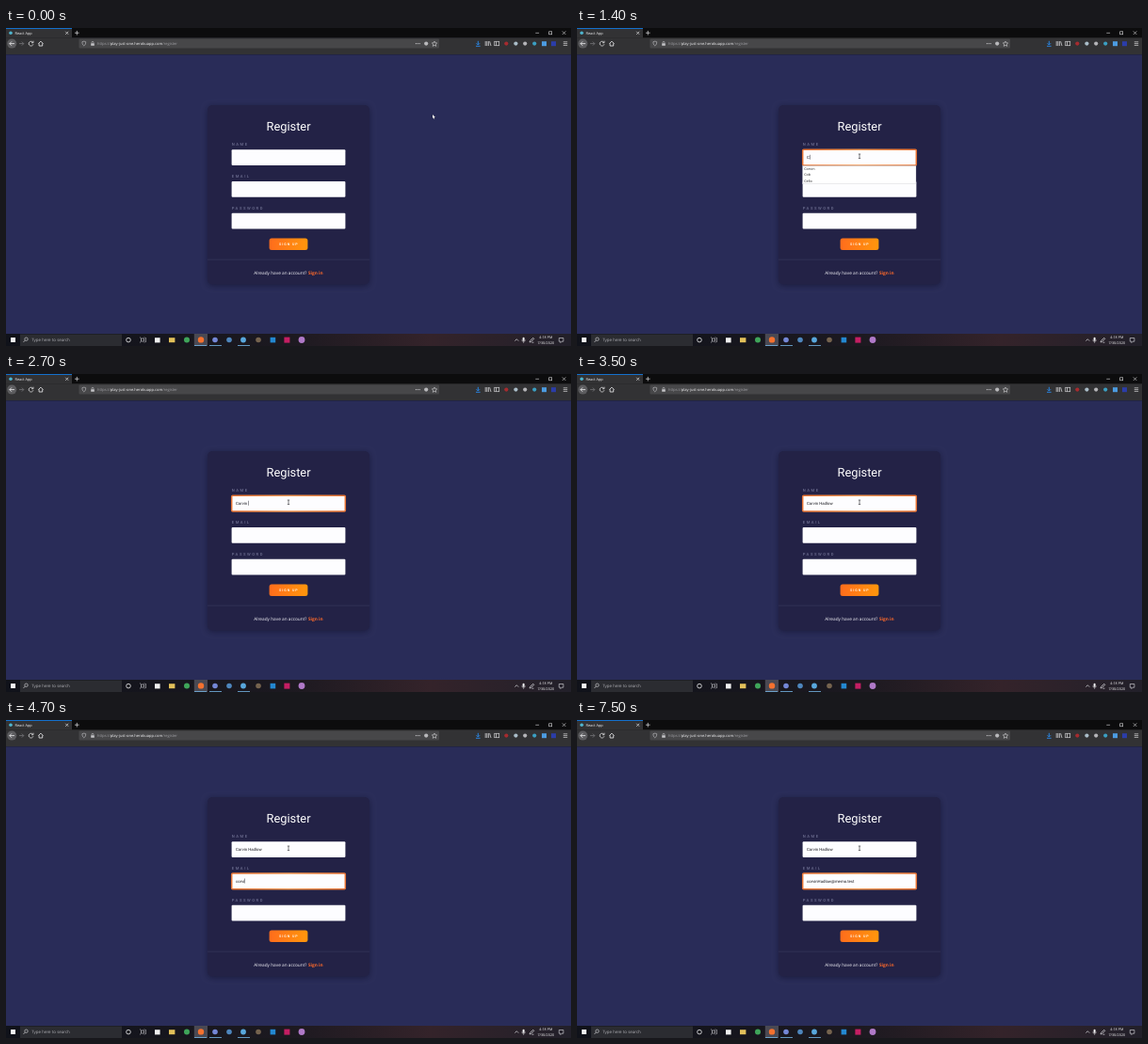
Animation of 600x338 px, one loop 8 s. Source, as an HTML page with a canvas:

```html
<!DOCTYPE html>
<html lang="en">
<head>
<meta charset="utf-8">
<title>Register form</title>
<style>
  html, body { margin: 0; width: 100%; height: 100%; overflow: hidden; background: #292c58; }
  canvas { display: block; width: 600px; height: 338px; }
</style>
</head>
<body>
<canvas id="stage"></canvas>
<script>
const LOOP = 8000;
const ROBOTO = 'Roboto, sans-serif';
const UI = '"Open Sans", sans-serif';
const canvas = document.getElementById('stage');
const ctx = canvas.getContext('2d');
const ratio = window.devicePixelRatio || 1;
canvas.width = 600 * ratio;
canvas.height = 338 * ratio;

// Keys are [time, number of typed characters]; popups are [from, to, rows].
const fields = [
  {
    label: 'NAME', y: 129.5, focus: [600, 3800], text: 'Corvin Hadlow',
    keys: [[1300, 1], [1500, 2], [1700, 3], [1800, 4], [2000, 5], [2200, 6], [2700, 7],
      [2800, 8], [2900, 9], [3000, 10], [3100, 12], [3300, 13]],
    popups: [[1400, 1500, 3], [1500, 1700, 1]],
    hints: ['Corvin', 'Cob', 'Cello']
  },
  {
    label: 'EMAIL', y: 163.3, focus: [3800, LOOP], text: 'corvinHadlow@memo.test',
    keys: [[4000, 1], [4200, 2], [4400, 3], [4600, 4], [4700, 5], [4800, 6], [5400, 7],
      [5500, 8], [5600, 9], [5700, 11], [5900, 12], [6300, 13], [6400, 14], [6500, 15],
      [6700, 16], [6800, 17], [6900, 17], [7000, 18], [7200, 20], [7300, 22]],
    popups: [[4000, 4100, 1], [4100, 4300, 6], [4300, 4400, 1]],
    hints: ['c@c.test', 'cc@c.test', 'cob@c.test', 'co@co.test', 'cello@c.test', 'c@memo.test']
  },
  { label: 'PASSWORD', y: 197, focus: [LOOP, LOOP], text: '', keys: [], popups: [], hints: [] }
];

function rect(x, y, w, h, color, radius = 0) {
  ctx.fillStyle = color;
  ctx.beginPath();
  ctx.roundRect(x, y, w, h, radius);
  ctx.fill();
}

function disc(x, y, r, color) {
  ctx.fillStyle = color;
  ctx.beginPath();
  ctx.arc(x, y, r, 0, Math.PI * 2);
  ctx.fill();
}

function ring(x, y, r, color, width = 0.8) {
  ctx.strokeStyle = color;
  ctx.lineWidth = width;
  ctx.beginPath();
  ctx.arc(x, y, r, 0, Math.PI * 2);
  ctx.stroke();
}

function frame(x, y, w, h, color, width = 0.7) {
  ctx.strokeStyle = color;
  ctx.lineWidth = width;
  ctx.strokeRect(x, y, w, h);
}

function path(d, color, width = 0.8) {
  ctx.strokeStyle = color;
  ctx.lineWidth = width;
  ctx.stroke(new Path2D(d));
}

function shape(d, color) {
  ctx.fillStyle = color;
  ctx.fill(new Path2D(d));
}

function text(str, x, y, size, color, { font = UI, weight = 400, align = 'left', spacing = 0 } = {}) {
  ctx.font = `${weight} ${size}px ${font}`;
  ctx.letterSpacing = spacing + 'px';
  ctx.textAlign = align;
  ctx.textRendering = 'geometricPrecision';
  ctx.fillStyle = color;
  ctx.fillText(str, x, y);
  return ctx.measureText(str).width;
}

function gradient(x0, x1, ...colors) {
  const g = ctx.createLinearGradient(x0, 0, x1, 0);
  colors.forEach((c, i) => g.addColorStop(i / (colors.length - 1), c));
  return g;
}

function drawBrowser() {
  rect(0, 0, 600, 10.5, '#0c0c0d');
  rect(0, 0, 70, 10.5, '#323234');
  rect(0, 0, 70, 0.8, '#0a84ff');
  disc(5, 5.3, 1.8, '#4fb6cf');
  text('React App', 9.5, 7, 3.9, '#f2f2f4');
  path('M63.2 3.8l3 3m0-3l-3 3M73 5.2h4.6M75.3 2.9v4.6', '#e4e4e6', 0.7);
  path('M562.3 5.3h3.8M590.8 3.4l3.6 3.6m0-3.6l-3.6 3.6', '#dedee0', 0.6);
  frame(576.7, 3.8, 3, 3, '#dedee0', 0.6);

  rect(0, 10.5, 600, 17.5, '#323234');
  disc(6.2, 16.6, 5, '#5c5c5f');
  path('M9 16.6H3.8m2.2-2.2l-2.2 2.2 2.2 2.2', '#f0f0f2');
  path('M14 16.6h4.8m-2-2l2 2-2 2', '#77777a');
  path('M28.6 15.3a2.4 2.4 0 1 0 .3 2M29 13.7v2h-2', '#dcdcde');
  path('M34.3 16.7l2.6-2.6 2.6 2.6M35.1 16.3v2.7h3.6v-2.7', '#dcdcde', 0.9);

  rect(77.5, 11.6, 382.5, 10, '#474749', 1);
  path('M82.8 14.1l1.9.6c0 2-.5 3.3-1.9 4.2-1.4-.9-1.9-2.2-1.9-4.2z', '#c5c5c8', 0.6);
  rect(90.2, 16.2, 3.6, 2.6, '#c5c5c8', 0.4);
  path('M91 16.3v-1a1 1 0 0 1 2 0v1', '#c5c5c8', 0.6);
  let x = 97;
  x += text('https://', x, 18, 4.05, '#a0a0a4');
  x += text('play-just-one.herokuapp.com', x, 18, 4.05, '#f4f4f6');
  text('/register', x, 18, 4.05, '#a0a0a4');
  for (let i = 0; i < 3; i++) disc(435.4 + i * 1.9, 16.6, 0.6, '#d4d4d6');
  disc(446.2, 16.6, 2.1, '#b8b8bb');
  path('M455 14l.8 1.8 1.9.2-1.4 1.3.4 2-1.7-1-1.7 1 .4-2-1.4-1.3 1.9-.2z', '#d8d8da', 0.6);

  path('M501.3 13.8v4m-1.8-1.6l1.8 1.8 1.8-1.8M499 19.3h4.6', '#2a8cf0', 0.9);
  path('M509.2 14v5m1.6-5v5m1.6-5v5m1.2-4.8l1.4 4.8', '#d0d0d2', 0.8);
  frame(518.7, 14.3, 5, 4.4, '#d0d0d2');
  path('M520.6 14.3v4.4', '#d0d0d2');
  disc(531.3, 16.6, 2.1, '#a52b2f');
  disc(541.4, 16.6, 2.1, '#a9bcc8');
  disc(551.2, 16.6, 2.1, '#b4b4b8');
  disc(561.2, 16.6, 2.1, '#3b9fc2');
  rect(569, 14.2, 5, 5, '#4c9be0');
  rect(579, 14.2, 5, 5, '#2b3da8');
  path('M591.8 14.8h4.4m-4.4 1.8h4.4m-4.4 1.8h4.4', '#d8d8da', 0.7);
}

function drawPage() {
  rect(0, 28, 600, 297, '#292c58');
  rect(0, 27.6, 600, 0.8, '#1c1d33');
  ctx.save();
  ctx.shadowColor = 'rgba(12,12,35,.5)';
  ctx.shadowBlur = 6 * ratio;
  ctx.shadowOffsetY = 1.5 * ratio;
  rect(214, 82, 172, 190.5, '#232246', 5);
  ctx.restore();
  rect(214, 245.7, 172, 0.7, '#34345a');
  text('Register', 300, 108.7, 12.85, '#ffffff', { font: ROBOTO, align: 'center' });
  rect(279.6, 223.4, 40.8, 12.6, gradient(280, 320, '#ff6d1c', '#ff960c'), 2.5);
  text('SIGN UP', 290, 231.1, 3.65, '#fff0df', { font: ROBOTO, weight: 700, spacing: 0.95 });
  text('Already have an account?', 319.4, 261.5, 4.75, '#f4f4f8', { align: 'right' });
  text('Sign in', 320.9, 261.5, 4.75, '#ff6a2b', { weight: 700 });
}

function drawField(field, t) {
  const { y } = field;
  text(field.label, 239.8, y - 4.1, 4.2, '#6d6e90', { font: ROBOTO, weight: 500, spacing: 1.5 });
  rect(239.6, y - 0.2, 120.8, 16.7, '#fdfdff', 1);
  const focused = t >= field.focus[0] && t < field.focus[1];
  if (focused) {
    ctx.strokeStyle = gradient(239, 361, '#e87434', '#f39a55', '#e87434');
    ctx.lineWidth = 1.5;
    ctx.beginPath();
    ctx.roundRect(239.7, y - 0.2, 120.6, 16.7, 1);
    ctx.stroke();
  }

  const typed = field.keys.filter(k => k[0] <= t);
  const count = typed.length ? typed[typed.length - 1][1] : 0;
  const next = field.keys[typed.length];
  const width = text(field.text.slice(0, count), 244, y + 9.3, 4.28, '#16161c', { font: ROBOTO });
  if (focused && count && next && next[0] - typed[typed.length - 1][0] <= 200) {
    rect(244.2 + width, y + 5.3, 0.5, 5, '#30303a');
  }
}

function drawPopup(field, t) {
  const popup = field.popups.find(p => t >= p[0] && t < p[1]);
  if (!popup) return;
  const top = field.y + 16.9;
  rect(239.5, top, 120.5, popup[2] * 6.4 + 0.2, '#ffffff');
  frame(239.5, top, 120.5, popup[2] * 6.4 + 0.2, '#b9b9c2', 0.3);
  field.hints.slice(0, popup[2]).forEach((hint, i) =>
    text(hint, 241.2, top + 4.3 + i * 6.4, 3.75, '#202024'));
}

function drawTaskbar() {
  rect(0, 325, 600, 13, gradient(0, 600, '#10121a', '#15151d', '#1c1920', '#34232a', '#22202a'));
  rect(5, 329, 5, 5, '#f2f2f4');
  rect(15, 325.4, 108, 12.6, '#2b2c31');
  ring(21.5, 330.7, 1.7, '#cfcfd2', 0.7);
  path('M20.3 332l-1.9 2', '#cfcfd2', 0.7);
  text('Type here to search', 27.2, 333.4, 4.45, '#b0b0b5');
  ring(130, 331.6, 2.3, '#f0f0f2', 0.8);
  frame(143.3, 330, 3, 3, '#d8d8dc', 0.6);
  path('M142 329h1m3.5 0h1M142 334h1m3.5 0h1M148.4 329v5', '#d8d8dc', 0.6);

  rect(158, 329.2, 5.6, 5.2, '#f0f0f0');
  rect(173, 329.2, 6.4, 5, '#e2c05a');
  disc(192, 331.6, 3, '#3fa55a');
  rect(199.8, 325, 14.2, 13, '#4a4953');
  disc(207, 331.4, 3.2, '#f4712f');
  disc(222, 331.5, 2.8, '#7487d6');
  disc(237, 331.5, 2.8, '#4e86bd');
  disc(252, 331.5, 2.9, '#58a7dc');
  disc(268, 331.5, 2.8, '#75634e');
  rect(280.6, 328.8, 5.6, 5.6, '#2388d1');
  rect(295.4, 328.6, 6, 6, '#c51e63');
  disc(314, 331.5, 3.4, '#b079c8');
  for (const x of [200, 216, 246]) rect(x, 337.2, 13, 0.8, '#75b7e8');

  path('M540.4 332.6l1.9-1.9 1.9 1.9', '#e4e4e8', 0.7);
  rect(548.6, 328.7, 2, 4, '#f0f0f2', 1);
  path('M547.8 331.5a1.8 1.8 0 0 0 3.6 0M549.6 333.4v1.4', '#f0f0f2', 0.5);
  path('M556 334l.6-1.7 3.2-3 1 1-3.1 3.1zM558.4 334.2h2', '#e4e4e8', 0.7);
  text('4:18 PM', 573.3, 330.2, 3.75, '#f4f4f6', { align: 'center' });
  text('7/30/2020', 573.3, 336.2, 3.75, '#f4f4f6', { align: 'center' });
  path('M587.3 329.5h4.6v3.7h-1.7l-1.3 1.3v-1.3h-1.6z', '#e4e4e8', 0.6);
}

function drawPointer(t) {
  const step = Math.min(4, Math.floor(t / 100)) / 4;
  const k = step * step * (3 - 2 * step);
  const x = 453 + (300 - 453) * k;
  const y = 92 + (136.3 - 92) * k;
  ctx.save();
  ctx.translate(x, y);
  if (k === 1) {
    path('M-1.2-2.3h2.4M0-2.3v4.6M-1.2 2.3h2.4', '#25252b', 0.6);
  } else {
    const arrow = 'M0 0v4l.9-.8.7 1.5.7-.3-.7-1.5h1.3z';
    path(arrow, '#15151c', 0.4);
    shape(arrow, '#ffffff');
  }
  ctx.restore();
}

const start = performance.now();
function draw() {
  const t = (performance.now() - start) % LOOP;
  ctx.setTransform(ratio, 0, 0, ratio, 0, 0);
  drawPage();
  drawBrowser();
  fields.forEach(field => drawField(field, t));
  fields.forEach(field => drawPopup(field, t));
  drawTaskbar();
  drawPointer(t);
  requestAnimationFrame(draw);
}
draw();
</script>
</body>
</html>
```
